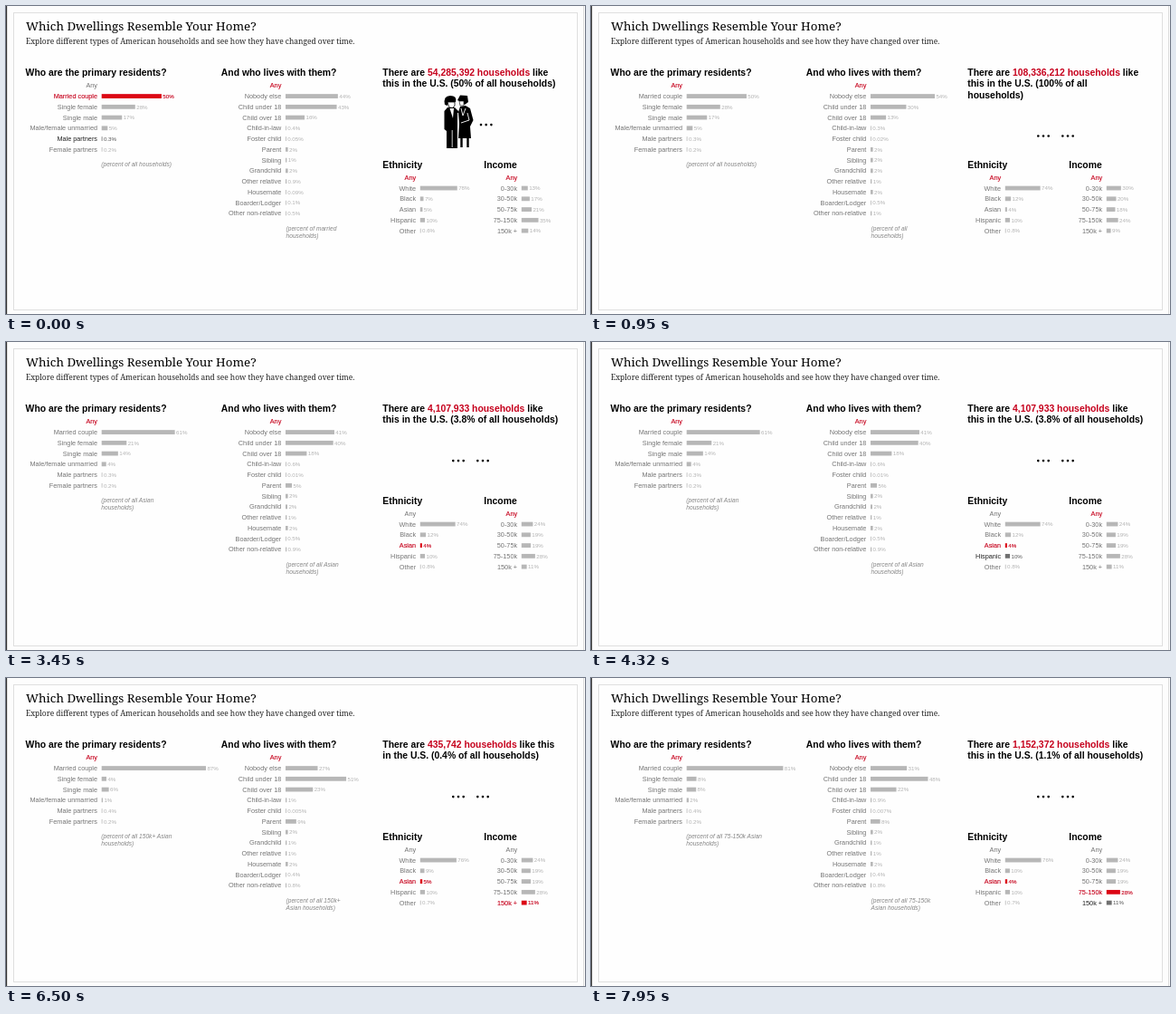
Recreate the animation shown at these times as an HTML page. Size 640 px wide and 340 px high, loop 8 s.

```html
<!DOCTYPE html>
<html lang="en">
<head>
<meta charset="utf-8">
<title>Households</title>
<style>
html, body { margin: 0; width: 100%; height: 100%; overflow: hidden; background: #fff; }
svg { display: block; width: 640px; height: 340px; }
text { font-family: "Liberation Sans", Arial, sans-serif; white-space: pre; }
.serif { font-family: "Noto Serif", serif; }
.head { font-size: 10.4px; font-weight: bold; }
.label { font-size: 7.3px; text-anchor: end; }
.value { font-size: 6.2px; }
.note { font-size: 6.6px; font-style: italic; fill: #858585; }
.on { stroke-width: .12px; }
</style>
</head>
<body>
<svg viewBox="0 0 640 340">
  <rect width="640" height="340" fill="#fdfdfd"/>
  <path d="M.5 0V340" stroke="#333"/>
  <path d="M1.5 0V340M638.5 0V340" stroke="#ddd"/>
  <rect x="8.5" y="7.5" width="623" height="328" fill="#fefefe" stroke="#dfdfdf"/>
  <text class="serif" x="22" y="27" font-size="13.4">Which Dwellings Resemble Your Home?</text>
  <text class="serif" x="22" y="41.7" font-size="8.42" fill="#222">Explore different types of American households and see how they have changed over time.</text>
  <g id="scene"></g>
</svg>
<script>
const LOOP = 8000, EASE_MS = 80, ROW = 11.76, LINE = 12.4, RED = '#c6001c';

const columns = [
  { title: 'Who are the primary residents?', x: 21.6, y: 77, barX: 105.7, scale: 1.325,
    rows: ['Married couple', 'Single female', 'Single male', 'Male/female unmarried', 'Male partners', 'Female partners'] },
  { title: 'And who lives with them?', x: 237.8, y: 77, barX: 309, scale: 1.315,
    rows: ['Nobody else', 'Child under 18', 'Child over 18', 'Child-in-law', 'Foster child', 'Parent', 'Sibling',
      'Grandchild', 'Other relative', 'Housemate', 'Boarder/Lodger', 'Other non-relative'] },
  { title: 'Ethnicity', x: 416.3, y: 178.5, barX: 457.8, scale: .525,
    rows: ['White', 'Black', 'Asian', 'Hispanic', 'Other'] },
  { title: 'Income', x: 528.3, y: 178.5, barX: 569.8, scale: .535,
    rows: ['0-30k', '30-50k', '50-75k', '75-150k', '150k +'] }
];

// Three measured profiles; the other groups are blends of them.
const blend = (a, b, k) => a.map((v, i) => v + (b[i] - v) * k);

const everyone = [[50, 28, 17, 5, .3, .2], [54, 30, 13, .3, .02, 2, 2, 2, 1, 2, .5, 1],
  [74, 12, 4, 10, .8], [30, 20, 18, 24, 9]];
const married = [everyone[0], [44, 43, 16, .4, .05, 2, 1, 2, .9, .09, .1, .5],
  [78, 7, 5, 10, .6], [13, 17, 21, 35, 14]];
const asianIncome = blend(everyone[3], married[3], .38);
const affluent = [[87, 4, 6, 1, .4, .2], [27, 51, 23, 1, .005, 9, 2, 1, 1, 2, .4, .8],
  blend(everyone[2], married[2], .6), asianIncome];
const asian = [blend(everyone[0], affluent[0], .3), blend(everyone[1], affluent[1], .48),
  everyone[2], asianIncome];
const middle = asian.map((col, c) => blend(col, affluent[c], .75));

// sel: chosen row per column, where 0 is "Any"
const states = [
  { at: 0, sel: [1, 0, 0, 0], data: married, couple: true, count: '54,285,392',
    lines: ['like', 'this in the U.S. (50% of all households)'],
    notes: [['(percent of all households)'], ['(percent of married', 'households)']] },
  { at: 860, sel: [0, 0, 0, 0], data: everyone, count: '108,336,212',
    lines: ['like', 'this in the U.S. (100% of all', 'households)'],
    notes: [['(percent of all households)'], ['(percent of all', 'households)']] },
  { at: 2400, sel: [0, 0, 3, 0], data: asian, count: '4,107,933',
    lines: ['like', 'this in the U.S. (3.8% of all households)'],
    notes: [['(percent of all Asian', 'households)'], ['(percent of all Asian', 'households)']] },
  { at: 5450, sel: [0, 0, 3, 5], data: affluent, count: '435,742',
    lines: ['like this', 'in the U.S. (0.4% of all households)'],
    notes: [['(percent of all 150k+ Asian', 'households)'], ['(percent of all 150k+', 'Asian households)']] },
  { at: 7050, sel: [0, 0, 3, 4], data: middle, count: '1,152,372',
    lines: ['like', 'this in the U.S. (1.1% of all households)'],
    notes: [['(percent of all 75-150k Asian', 'households)'], ['(percent of all 75-150k', 'Asian households)']] }
];

// pointer position over time
const hovers = [
  { at: 0, name: 'Male partners' }, { at: 50, name: 'Female partners' }, { at: 250 },
  { at: 1730, name: 'Hispanic' }, { at: 2250, name: 'Asian' },
  { at: 4300, name: 'Hispanic' }, { at: 4450 },
  { at: 4650, name: '150k +' }, { at: 6910, name: '75-150k' }, { at: 7500, name: '150k +' }
];

const looks = {
  selected: { label: RED, bar: '#dc0614', value: RED },
  hovered: { label: '#222', bar: '#707070', value: '#555' },
  plain: { label: '#747474', bar: '#b7b7b7', value: '#b2b2b2' }
};

const text = (cls, x, y, str, fill = '#000', attrs = '') =>
  `<text class="${cls}" x="${x}" y="${y}" fill="${fill}" ${attrs}>${str}</text>`;
const dots = (x, y) =>
  [0, 1, 2].map(i => `<circle cx="${x + i * 5.7}" cy="${y}" r="1.3"/>`).join('');
const lastAt = (list, t) => list.filter(s => s.at <= t).pop();
const percent = v => (v < 1 ? +v.toPrecision(1) : Math.round(v)) + '%';

const couple = `
  <path d="M485 109Q483 99 491 99Q499 99 497 106H489L488 110Z"/>
  <path d="M488 106H496V110Q494 114 490 112Z" fill="#fff" stroke="#000" stroke-width=".8"/>
  <path d="M488 112L484.5 116V136L487 138V157H499V130L500 116L496 112Z"/>
  <path d="M490.5 113H495L494 124Z" fill="#fff"/>
  <path d="M493.2 137V156" stroke="#fff" stroke-width=".8"/>
  <path d="M499 104L502 98.5L510 99L511 106L507 109L501 105Z"/>
  <path d="M501 105H506V110H502Z" fill="#fff" stroke="#000" stroke-width=".6"/>
  <path d="M502 111L500 117L501 130L500 146H514L513 133L516.5 126L513 113L508 110Z"/>
  <path d="M503 113L505 121L508 113M510 118L512 126L503 129M499.5 118V146" fill="none" stroke="#fff" stroke-width=".9"/>
  <path d="M503.5 146V156M510.5 146V156" stroke="#000" stroke-width="2.4"/>`;

function drawRow(col, r, name, look, value, shown) {
  const y = col.y + 10.7 + r * ROW, c = looks[look];
  const [cls, edge] = look === 'selected' ? [' on', `stroke="${RED}"`] : ['', ''];
  const label = text('label' + cls, col.barX - 4.7, y + 2.6, name, c.label, edge);
  if (!r) return label;
  const w = Math.max(.8, shown * col.scale);
  return label +
    `<rect x="${col.barX}" y="${y - 2.3}" width="${w}" height="4.8" fill="${c.bar}"/>` +
    text('value' + cls, col.barX + w + 1.4, y + 2.4, percent(value), c.value, edge);
}

function drawColumn(col, c, state, shown, hover) {
  const rows = ['Any', ...col.rows].map((name, r) => {
    const look = state.sel[c] === r ? 'selected' : hover.name === name ? 'hovered' : 'plain';
    return drawRow(col, r, name, look, state.data[c][r - 1], shown[c][r - 1]);
  });
  return text('head', col.x, col.y, col.title) + rows.join('');
}

function scene(t) {
  const state = lastAt(states, t), hover = lastAt(hovers, t);
  const prev = states[Math.max(0, states.indexOf(state) - 1)];
  const p = Math.min(1, (t - state.at) / EASE_MS);
  const shown = state.data.map((data, c) => blend(prev.data[c], data, p * (2 - p)));
  let out = columns.map((col, c) => drawColumn(col, c, state, shown, hover)).join('');
  state.notes.forEach((lines, i) => lines.forEach((line, n) =>
    out += text('note', [105.3, 309.6][i], [177.2, 248][i] + n * 8, line)));
  const [tail, ...rest] = state.lines;
  out += text('head', 416.3, 77, `There are <tspan fill="${RED}">${state.count} households</tspan> ${tail}`);
  rest.forEach((line, n) => out += text('head', 416.3, 77 + (n + 1) * LINE, line));
  const y = 118.7 + rest.length * LINE;
  return out + (state.couple ? couple + dots(525, y) : dots(494.3, y) + dots(521.3, y));
}

const stage = document.getElementById('scene');
const start = performance.now();
function tick() {
  stage.innerHTML = scene((performance.now() - start) % LOOP);
  requestAnimationFrame(tick);
}
tick();
</script>
</body>
</html>
```
